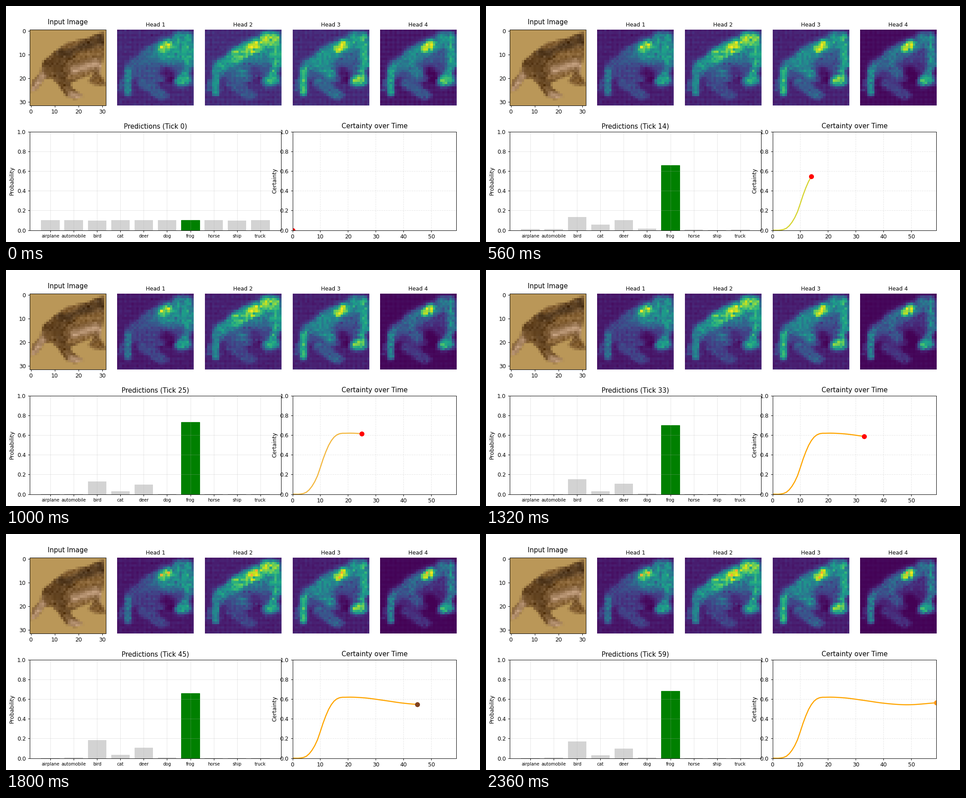
Animation, 1058 px wide and 529 px high, one loop 2.4 s. Source, as a matplotlib script:

```python
import numpy as np
import matplotlib.pyplot as plt
from matplotlib.animation import FuncAnimation
from matplotlib.gridspec import GridSpec
from matplotlib.path import Path

TICKS = 60
N = 32
CLASSES = ["airplane", "automobile", "bird", "cat", "deer",
           "dog", "frog", "horse", "ship", "truck"]
FROG = CLASSES.index("frog")

rng = np.random.default_rng(4)
gx, gy = np.meshgrid(np.arange(N), np.arange(N))


def smooth_curve(t, x, y):
    """Cubic Hermite curve through the points (x, y)."""
    x, y = np.array(x, float), np.array(y, float)
    m = np.gradient(y, x)
    i = np.clip(np.searchsorted(x, t, side="right") - 1, 0, len(x) - 2)
    h = x[i + 1] - x[i]
    s = (t - x[i]) / h
    return ((1 + 2 * s) * (1 - s) ** 2 * y[i] + s * (1 - s) ** 2 * h * m[i]
            + s * s * (3 - 2 * s) * y[i + 1] + s * s * (s - 1) * h * m[i + 1])


def stroke(x1, y1, x2, y2, width, power=3):
    """Soft mark along a segment, 1 at its core."""
    dx, dy = x2 - x1, y2 - y1
    k = ((gx - x1) * dx + (gy - y1) * dy) / (dx * dx + dy * dy)
    k = np.clip(k, 0, 1)
    d = np.hypot(gx - x1 - k * dx, gy - y1 - k * dy)
    return np.exp(-(d / width) ** power)


def coverage(points, sub=4):
    """Share of each cell lying inside a polygon."""
    c = (np.arange(N * sub) + 0.5) / sub
    px, py = np.meshgrid(c, c)
    hit = Path(points).contains_points(np.c_[px.ravel(), py.ravel()])
    return hit.reshape(N, sub, N, sub).mean(axis=(1, 3))


# ---- the animal picture
body = coverage([
    (31, 1.2), (28, 2), (24, 3.8), (16, 5.5), (11, 9), (5.5, 13.5),
    (4.5, 18), (1, 22), (0.4, 26.7), (3.5, 25), (6, 21), (9, 20.5),
    (12, 23.5), (15, 28), (19, 29.5), (22.5, 28), (17.5, 24.5), (17, 22.5),
    (26.5, 18.5), (24.5, 22), (27, 23.5), (32, 23.5), (29.5, 18.5),
    (31, 10)])

TONES = {"dark": "#46301a", "umber": "#5c3e1e", "pale": "#c4a080",
         "fawn": "#8e6838"}
PAINT = [
    ("dark", 13, 9, 16, 9, 2.8), ("dark", 20, 7, 25, 6, 2.3),
    ("dark", 28.5, 3, 29.5, 5, 2), ("umber", 7, 14, 12, 14, 2.2),
    ("fawn", 20, 11, 29, 9, 2), ("umber", 12, 18, 16, 21, 2.3),
    ("fawn", 14, 7, 19, 5, 1.5), ("pale", 18, 17, 27, 14, 2.2),
    ("fawn", 16, 20, 25, 18, 1.3), ("pale", 1, 25, 5, 19, 1.6),
    ("pale", 17, 27, 21, 28, 1.6), ("fawn", 26, 22, 30, 20, 1.3),
    ("pale", 29, 15, 30, 18, 1.3),
]


def rgb(name):
    return np.array(plt.matplotlib.colors.to_rgb(name))


skin = np.ones((N, N, 3)) * rgb("#725028")
for tone, *seg in PAINT:
    a = 0.85 * stroke(*seg, power=2)[..., None]
    skin = skin * (1 - a) + rgb(TONES[tone]) * a
skin += rng.normal(0, .035, (N, N, 1))
ground = rgb("#ba9758")
photo = np.clip(ground + (skin - ground) * body[..., None], 0, 1)

# ---- attention maps: shared body parts, weighted per head
PARTS = [stroke(*p) for p in (
    (6, 15, 14, 11, 2.9),         # rump
    (13, 10.5, 27, 4, 3.4),       # back
    (20.5, 9, 28.5, 9, 4.8),      # face
    (29, 3, 29.5, 14, 2),         # snout
    (29.5, 14, 28, 18, 1.7),      # throat
    (25, 3, 28, 4, 2.2),          # crown
    (18.5, 7.5, 20.5, 6, 2),      # eye
    (26, 21, 28, 20.5, 2.6),      # front foot
    (4, 17, 4, 26, 1.6),          # hind foot
    (11, 14, 15, 18, 3),          # belly
    (10, 22, 18, 27, 2.2),        # leg
    (20, 17.5, 22, 19, 2.6),      # hollow
)]
WEIGHTS = [
    (.32, .40, .64, .66, .50, .62, 1.0, .70, .52, .28, .32, -.2),
    (.60, .78, .52, .70, .60, .92, 1.0, .68, .56, .42, .28, -.1),
    (.53, .58, .34, .66, .62, .60, 1.0, .84, .74, .55, .36, -.2),
    (.46, .50, .30, .60, .56, .52, 1.0, .78, .62, .44, .30, -.2),
]
BASE = [.13, .14, .13, .07]
GROWTH = [.32, .25, .22, .62]


def attention(base, weights):
    v = base + .14 * body
    for m, w in zip(PARTS, weights):
        v = v + w * m if w < 0 else np.maximum(v, v + (w - v) * m)
    weave = 0.025 * ((gx % 2) + (gy % 2) - 1)
    v = v * (1 + rng.normal(0, .1, (N, N))) + weave
    return np.clip(v / v.max(), 0.005, 1)


maps = [attention(b, w) for b, w in zip(BASE, WEIGHTS)]

# ---- certainty and class probabilities
ticks = np.arange(TICKS)
certainty = smooth_curve(
    ticks,
    [0, 3, 5, 7, 9, 11, 13, 15, 17, 19, 25, 33, 40, 48, 59],
    [0, .002, .02, .08, .187, .355, .495, .58, .614, .618, .614, .586,
     .558, .542, .562])
frog = np.interp(np.sqrt(np.maximum(certainty, 0)),
                 np.sqrt([0, .187, .545, .562, .586, .614, .618]),
                 [.104, .38, .657, .68, .70, .733, .742])

LONG, SHORT = [0, 9, 20, 33, 45, 59], [0, 9, 20, 59]
SHARES = {  # in thousandths
    "airplane": [100, 46, 3, 3],
    "automobile": [100, 46, 3, 8],
    "bird": [99, 172, 125, 152, 183, 172],
    "cat": [100, 108, 33, 28, 32, 29],
    "deer": [100, 132, 97, 108, 108, 100],
    "dog": [100, 48, 4, 8],
    "horse": [100, 24, 1, 1],
    "ship": [99, 20, 1, 1],
    "truck": [100, 32, 1, 1],
}


def share(name):
    if name not in SHARES:
        return np.zeros(TICKS)
    y = SHARES[name]
    return np.exp(np.interp(ticks, LONG if len(y) > 4 else SHORT, np.log(y)))


probs = np.array([share(c) for c in CLASSES])
probs *= (1 - frog) / probs.sum(axis=0)
probs[FROG] = frog

# ---- figure
fig = plt.figure(figsize=(12, 6), dpi=88.167, facecolor="white")
grid = GridSpec(2, 5, figure=fig, left=.05, right=.95, top=.9, bottom=.05,
                wspace=.15, hspace=.3, height_ratios=[1, 1.3])

ax = fig.add_subplot(grid[0, 0])
ax.imshow(photo, interpolation="nearest")
ax.set_xticks(range(0, N, 10))
ax.set_yticks(range(0, N, 10))
ax.set_title("Input Image", pad=10)

cmap = plt.get_cmap("viridis").copy()
cmap.set_over("#fbab33")
views = []
for i, v in enumerate(maps):
    ax = fig.add_subplot(grid[0, i + 1])
    views.append(ax.imshow(v, cmap=cmap, vmin=0, vmax=1,
                           interpolation="nearest"))
    ax.set_title(f"Head {i + 1}", fontsize=10)
    ax.axis("off")

ax_bar = fig.add_subplot(grid[1, :3])
bars = ax_bar.bar(range(10), probs[:, 0], color="lightgray")
bars[FROG].set(facecolor="green", edgecolor="green", linewidth=1)
ax_bar.set_xlim(-.89, 9.89)
ax_bar.set_ylim(0, 1)
ax_bar.set_xticks(range(10))
ax_bar.set_xticklabels(CLASSES, fontsize=8)
ax_bar.set_ylabel("Probability")
ax_bar.grid(True, alpha=.3)
bar_title = ax_bar.set_title("Predictions (Tick 0)")

ax_cert = fig.add_subplot(grid[1, 3:])
ax_cert.set_xlim(0, TICKS - 1)
ax_cert.set_ylim(0, 1)
ax_cert.set_xticks(range(0, TICKS, 10))
ax_cert.set_xlabel("Tick")
ax_cert.set_ylabel("Certainty")
ax_cert.set_title("Certainty over Time")
ax_cert.grid(True, linestyle="--", alpha=.3)
curve, = ax_cert.plot([], [], lw=2)
dot, = ax_cert.plot([], [], "o", ms=8)

CURVE_COLOURS = [(0, "#d6d42f"), (23, "#f3b73e"), (30, "orange")]
DOT_COLOURS = [(0, "red"), (40, "#80421f"), (53, "#ff9a1a")]


def pick(steps, t):
    return [c for start, c in steps if t >= start][-1]


def draw(t):
    focus = 1 - np.exp(-t / 22)
    for view, v, growth in zip(views, maps, GROWTH):
        view.set_data(v ** (1 + growth * focus))
        view.set_clim(0, 1 if t < 40 else .97)
    for bar, p in zip(bars, probs[:, t]):
        bar.set_height(p)
    bar_title.set_text(f"Predictions (Tick {t})")
    curve.set_data(ticks[:t + 1], certainty[:t + 1])
    curve.set_color(pick(CURVE_COLOURS, t))
    dot.set_data([t], [certainty[t]])
    dot.set_color(pick(DOT_COLOURS, t))
    return [*views, *bars, bar_title, curve, dot]


anim = FuncAnimation(fig, draw, frames=TICKS, interval=40, repeat=True,
                     repeat_delay=0, blit=False)
plt.show()
```
